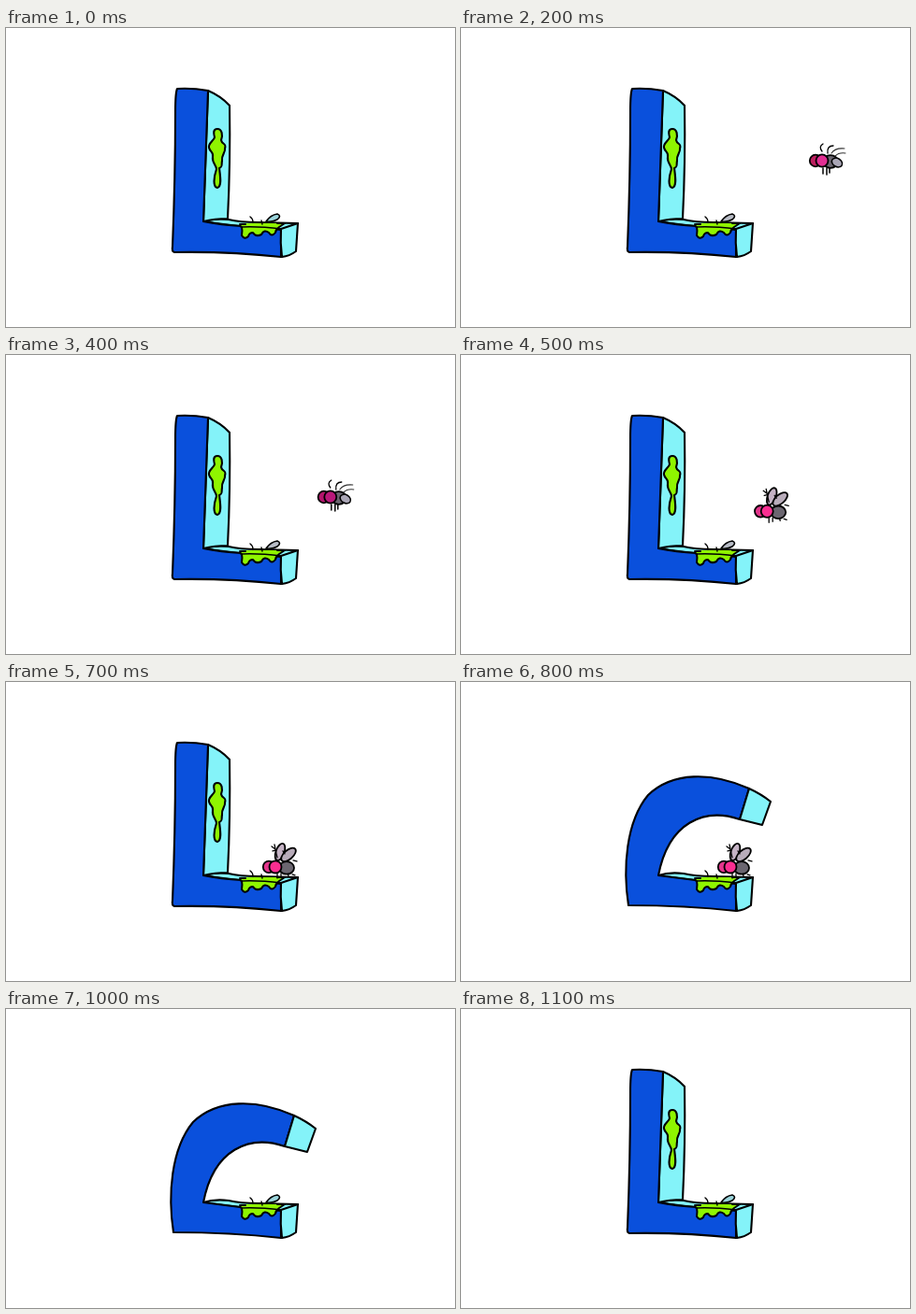
Animation of 480x320 px, one loop 1.2 s. Source, as an HTML page with a canvas:

```html
<!DOCTYPE html>
<html lang="en">
<head>
<meta charset="utf-8">
<title>Letter L and the fly</title>
<style>
html, body { margin: 0; width: 100%; height: 100%; overflow: hidden; background: #fff; }
canvas { display: block; }
</style>
</head>
<body>
<canvas id="stage" width="480" height="320"></canvas>
<script>
const ctx = document.getElementById('stage').getContext('2d');
const BLUE = '#0a50dc', CYAN = '#84f3f9', LIME = '#8ff500', GREY = '#6b6670';
const STEP = 100, STEPS = 12;
ctx.lineCap = ctx.lineJoin = 'round';

function shape(d, fill, width = 2.1, ink = '#000') {
  const path = new Path2D(d);
  if (fill) { ctx.fillStyle = fill; ctx.fill(path); }
  if (width) { ctx.lineWidth = width; ctx.strokeStyle = ink; ctx.stroke(path); }
}

function oval(x, y, rx, ry, fill, turn = 0, width = 1.8) {
  ctx.beginPath();
  ctx.ellipse(x, y, rx, ry, turn, 0, 7);
  ctx.fillStyle = fill;
  ctx.fill();
  ctx.lineWidth = width;
  ctx.strokeStyle = '#000';
  ctx.stroke();
}

function footEnd() {
  shape('M294 215L312 209Q311 225 310 239Q303 244 295 245Q293 230 294 215Z', CYAN);
}

function footSlime() {
  shape('M251 209H298L291 213Q288 216 288 219Q284 224 281 219Q276 215 273 221Q267 224 264 219Q260 219 259 223Q255 227 252 222Q253 217 252 213Z', LIME, 0);
  shape('M250 210H256M290 209H298L292 213Q288 216 288 219Q284 224 281 219Q276 215 273 221Q267 224 264 219Q260 219 259 223Q255 227 252 222Q253 217 252 213', null, 2);
  shape('M251 213Q270 212 294 215', null, 1.5);
}

function squashedFly(wing) {
  if (wing) shape('M278 207Q283 200 290 199Q295 201 290 205Q285 208 278 207Z', wing, 1.6);
  shape('M261 202Q264 204 264 208M273 206L274 210', null, 1.4);
}

function standing(wing) {
  shape('M211 207Q223 203 238 205Q250 208 270 208L312 209L294 216Q250 213 211 207Z', CYAN);
  shape('M216 67Q230 73 239 83Q240 145 237 204Q223 204 211 207Z', CYAN);
  shape('M183 65Q199 64 216 67Q214 130 211 207Q230 211 252 212Q275 214 294 216V245Q240 239 180 240Q177 239 178 234Q181 160 181 90Q181 69 183 65Z', BLUE);
  footEnd();
  shape('M226 108C221 108 222 113 223 117C222 121 216 123 217 128C218 133 222 132 221 138C220 144 225 147 225 151C222 160 221 170 226 171C231 170 229 158 228 150C232 148 230 147 231 142C230 136 235 133 234 129C236 123 231 125 230 120C232 115 231 108 226 108Z', LIME);
  footSlime();
  squashedFly(wing);
}

function leaning(wing) {
  shape('M211 207Q223 203 238 205Q250 208 270 208L312 209L294 216Q250 213 211 207Z', CYAN);
  shape('M179 239C173 200 176 150 200 121C226 96 268 96 308 114L298 147C260 134 222 150 211 207Q252 213 294 216V245Q240 239 179 239Z', BLUE);
  shape('M308 114Q321 120 331 128L322 153L298 147Z', CYAN);
  footEnd();
  footSlime();
  squashedFly(wing);
}

function folded() {
  shape('M294 207L316 209Q315 222 316 236Q307 242 298 243Z', CYAN);
  shape('M182 197C196 188 215 180 240 180C278 181 310 176 349 181V216C328 211 310 206 293 208L298 243C260 241 215 238 187 237C171 234 172 206 182 197Z', BLUE);
  shape('M258 207H294L288 209Q284 213 278 210Q271 213 265 211Z', '#62c95d', 1.8);
  shape('M210 209C230 206 250 208 275 207C300 205 325 210 349 216', null);
  shape('M349 181Q371 183 383 190L382 210Q369 215 349 216Z', CYAN);
  oval(252.5, 249, 4.5, 2.1, '#ddd', -.08, 2);
}

// Drawn around the centre of the nearer eye.
function fly(x, y, wingsUp, far, near) {
  ctx.save();
  ctx.translate(x, y);
  if (wingsUp) {
    shape('M2 6V12M6 7V11M13 6L14 10M18 8L21 9M19 -7L23 -6', null, 1.3);
    oval(5, -16, 4.5, 9.5, '#c5b3c5', .35);
    oval(14, -13, 4.8, 9.5, '#b8acba', .85);
    shape('M-4 -22L0 -19L-1 -24M0 -19Q1 -14 2 -10M-3 -17L1 -18M8 -17L10 -14', null, 1.3);
    oval(12, 1, 8, 6.8, GREY);
  } else {
    shape('M1 8V14M5 8V15M8 8V13', null, 1.5);
    oval(9, 1, 8, 6.8, GREY);
    oval(16, 2, 6, 4.4, '#aaa6b6', .55, 1.5);
    shape('M0 -10Q-4 -15 1 -18M6 -8Q5 -16 12 -16', null, 1.3);
    shape('M10 -8Q14 -14 24 -13M14 -5Q18 -9 25 -8', null, 1.1, '#333');
  }
  oval(-7, 0, 6.2, 6.3, far);
  oval(0, 0, 6.5, 6.6, near);
  ctx.restore();
}

function draw(step) {
  ctx.fillStyle = '#fff';
  ctx.fillRect(0, 0, 480, 320);

  const edge = step === 0 || step > 9;
  const wing = edge ? '#9bd5dc' : '#b8bcc6';
  if (step === 9) return folded();
  if (step === 8 || step === 10) leaning(step === 10 && wing);
  else standing(step !== 7 && wing);

  if (step < 1 || step > 8) return;
  const n = Math.min(step, 7);
  const x = n === 1 ? 437 : 386 - (n - 2) * 19.6;
  const y = n < 5 ? 142 + (n - 2) * 5 : 152 + (n - 4) * 15.3;
  const eyes = n === 4 ? ['#b3146c', '#b9187a'] : n < 4 ? ['#bd205f', '#e12f93'] : ['#e3358b', '#fa2e91'];
  fly(x, y, n % 2 === 1, ...eyes);
}

function tick() {
  draw(Math.floor(performance.now() / STEP) % STEPS);
  requestAnimationFrame(tick);
}
tick();
</script>
</body>
</html>
```
